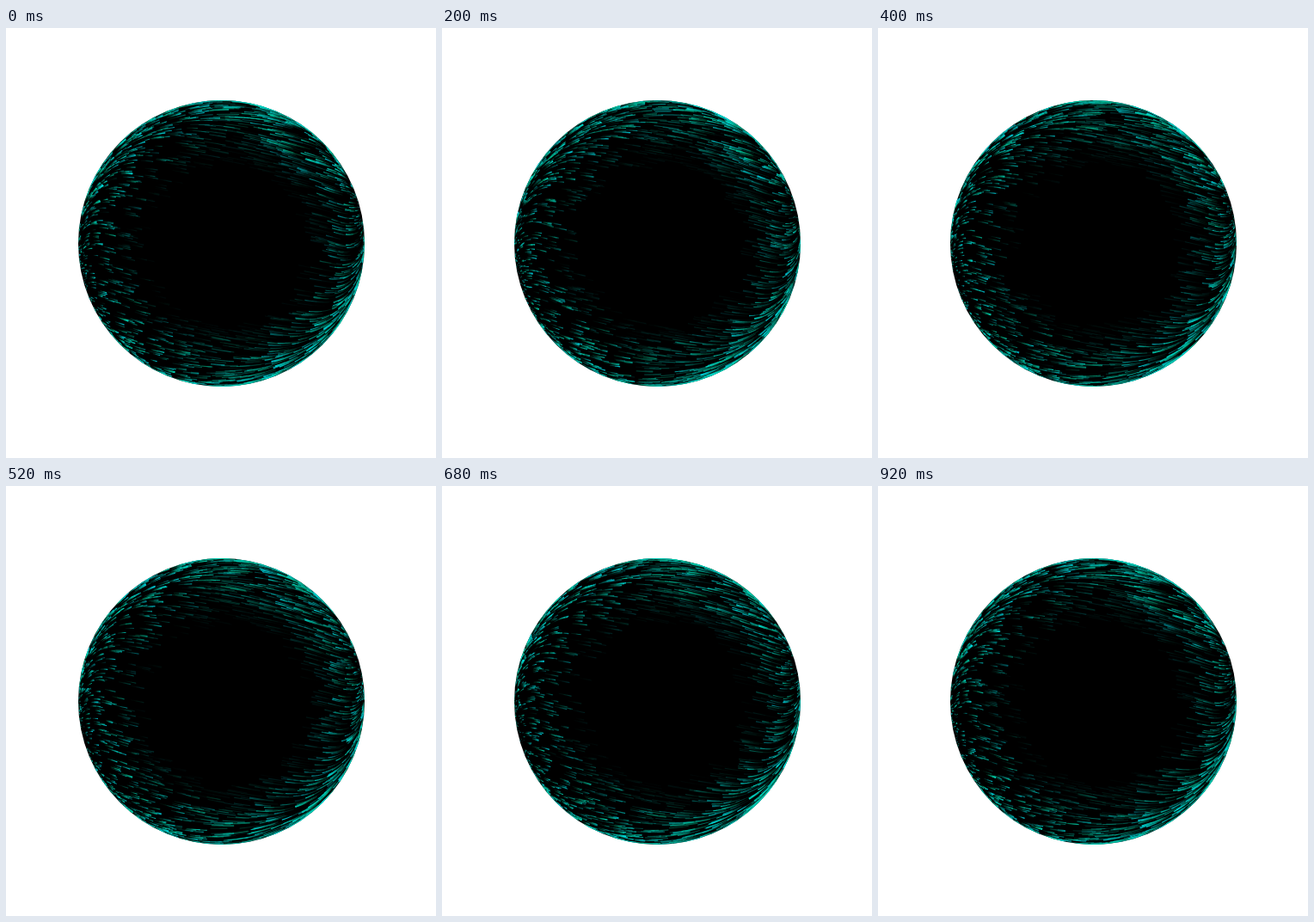
Animation of 500 by 500 pixels, one loop 960 ms. Source, as an HTML page with a canvas:

```html
<!DOCTYPE html>
<html lang="en">
<head>
<meta charset="utf-8">
<title>Streaming sphere</title>
<style>
  html, body { margin: 0; width: 100%; height: 100%; overflow: hidden; background: #fff; }
  canvas { display: block; width: 500px; height: 500px; }
</style>
</head>
<body>
<canvas id="stage" width="500" height="500"></canvas>
<script>
const ctx = document.getElementById('stage').getContext('2d');
const C = 250.5, R = 166.5;
const FRAME = 40, FRAMES = 24;
const STEP = 3.3 / R;          // distance covered in half a frame
const LIFE = FRAMES * 2;
const COUNT = 2100;

let seed = 20117;
function rand() {
  seed = (seed + 0x6D2B79F5) | 0;
  let t = Math.imul(seed ^ (seed >>> 15), 1 | seed);
  t = (t + Math.imul(t ^ (t >>> 7), 61 | t)) ^ t;
  return ((t ^ (t >>> 14)) >>> 0) / 4294967296;
}
const clamp = v => Math.max(0, Math.min(1, v));
const smooth = (a, b, v) => {
  const t = clamp((v - a) / (b - a));
  return t * t * (3 - 2 * t);
};

// Diagonal flow that bends until it runs along the rim.
function advance([x, y], dir) {
  const r = Math.hypot(x, y) || 1e-6;
  const angle = 0.2 - 0.44 * smooth(0.78, 1, r);
  const ux = Math.cos(angle), uy = Math.sin(angle);
  const k = Math.pow(r, 6) * (ux * x + uy * y) / (r * r);
  const nx = x + dir * STEP * (ux - k * x);
  const ny = y + dir * STEP * (uy - k * y);
  const s = Math.min(1, 0.998 / Math.hypot(nx, ny));
  return [nx * s, ny * s];
}

function makeStreak() {
  const z = rand() * 0.88, a = rand() * Math.PI * 2;
  const r = Math.sqrt(1 - z * z);
  const start = [r * Math.cos(a), r * Math.sin(a)];
  const back = [], path = [start];
  for (let i = 0, p = start; i < 30; i++) back.push(p = advance(p, -1));
  for (let i = 0, p = start; i < 34; i++) path.push(p = advance(p, 1));
  const bold = rand();
  return {
    path: back.reverse().concat(path),
    phase: Math.floor(rand() * LIFE),
    size: 0.65 + rand() * 0.6,
    width: bold > 0.9 ? 2.1 : 0.9 + bold * 0.5,
    glow: 0.4 + 0.6 * rand(),
    hue: rand()
  };
}
const streaks = Array.from({ length: COUNT }, makeStreak);

function strokePath(pts, from, to, width) {
  ctx.lineWidth = width;
  ctx.beginPath();
  for (let i = from; i <= to; i++) {
    ctx.lineTo(C + pts[i][0] * R, C + pts[i][1] * R);
  }
  ctx.stroke();
}

function drawStreak(s, frame) {
  const age = (s.phase + frame * 2) % LIFE;
  const [x, y] = s.path[age];
  const r = Math.hypot(x, y);
  const fade = smooth(0, 0.2, age / LIFE) * smooth(1, 0.8, age / LIFE);
  const alpha = s.glow * fade * Math.pow(smooth(0.48, 0.95, r), 1.25);
  if (alpha < 0.03) return;

  const span = Math.round((4.5 + 5.5 * smooth(-0.6, 0.6, x)) * s.size);
  const end = age + span, mid = age + (span >> 1);
  const tip = s.path[end];
  const lead = clamp(0.5 - 1.6 * x);   // 1: the right end is the bright one
  const shade = w => {
    const g = Math.round(185 + 40 * w);
    const b = Math.round(105 + 60 * s.hue + 85 * w);
    return `rgba(0,${g},${b},${alpha * (0.3 + 0.7 * w)})`;
  };
  const grad = ctx.createLinearGradient(C + x * R, C + y * R, C + tip[0] * R, C + tip[1] * R);
  grad.addColorStop(0, shade(1 - lead));
  grad.addColorStop(1, shade(lead));
  ctx.strokeStyle = grad;
  strokePath(s.path, age, mid, s.width * (1 - 0.4 * lead));
  strokePath(s.path, mid, end, s.width * (0.6 + 0.4 * lead));
}

function draw(frame) {
  ctx.fillStyle = '#fff';
  ctx.fillRect(0, 0, 500, 500);
  ctx.save();
  ctx.beginPath();
  ctx.arc(C, C, R, 0, Math.PI * 2);
  ctx.fillStyle = '#000';
  ctx.fill();
  ctx.clip();
  for (const s of streaks) drawStreak(s, frame);
  ctx.restore();
}

const begin = performance.now();
let shown = -1;
function tick() {
  const frame = Math.floor((performance.now() - begin) / FRAME) % FRAMES;
  if (frame !== shown) draw(shown = frame);
  requestAnimationFrame(tick);
}
tick();
</script>
</body>
</html>
```
